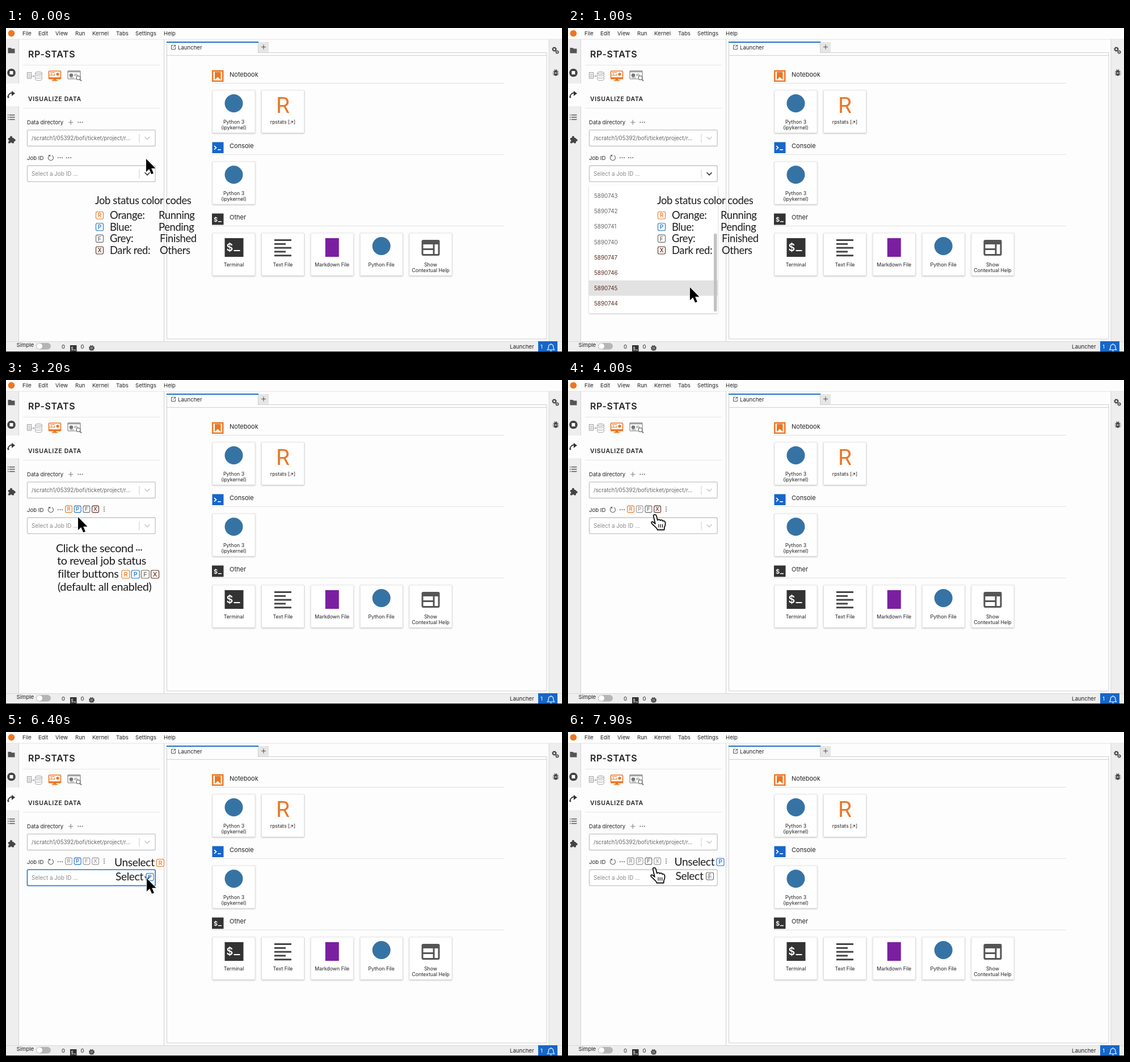
These frames come from a looping animation (980 by 572 pixels, 8 s). An HTML page:

```html
<!DOCTYPE html>
<html lang="en">
<head>
<meta charset="utf-8">
<title>Job filter demo</title>
<style>
html, body { margin: 0; width: 100%; height: 100%; overflow: hidden; background: #fff; }
svg { display: block; width: 980px; height: 572px; font-family: Inter, sans-serif; }
text { white-space: pre; }
.note { font-family: Lato, sans-serif; letter-spacing: -.38px; }
</style>
</head>
<body>
<svg viewBox="0 0 980 572">
  <defs>
    <filter id="shadow" x="-10%" y="-10%" width="120%" height="125%">
      <feDropShadow dx="0" dy="1" stdDeviation="1.3" flood-opacity=".28"/>
    </filter>
    <clipPath id="listClip"><rect x="37" y="279" width="227" height="223"/></clipPath>
  </defs>
  <g id="page"></g>
  <g id="live"></g>
</svg>
<script>
const ORANGE = '#ee7623', BLUE = '#1e6fc8', GREY = '#686868', RED = '#5c2a1e', DARK = '#333', OFF = '#999';

// Drawing helpers
const text = (x, y, s, size = 9.6, fill = '#222', more = '') =>
  `<text x="${x}" y="${y}" font-size="${size}" fill="${fill}" ${more}>${s}</text>`;
const rect = (x, y, w, h, fill, more = '') =>
  `<rect x="${x}" y="${y}" width="${w}" height="${h}" fill="${fill}" ${more}/>`;
const circle = (x, y, r, fill, more = '') =>
  `<circle cx="${x}" cy="${y}" r="${r}" fill="${fill}" ${more}/>`;
const line = (d, color, w = 1, more = '') =>
  `<path d="${d}" fill="none" stroke="${color}" stroke-width="${w}" ${more}/>`;
const shape = (d, fill, more = '') => `<path d="${d}" fill="${fill}" ${more}/>`;
const dots = (x, y, color, dx = 3.6, dy = 0, r = 1) =>
  [-1, 0, 1].map(i => circle(x + i * dx, y + i * dy, r, color)).join('');
const chevron = (y, color) => line(`M245 ${y - 2}l4 4l4-4`, color, 1.7, 'stroke-linecap="round"');
const mid = 'text-anchor="middle"';

function badge(x, y, letter, color, size = 12) {
  const h = size / 2;
  return rect(x - h, y - h, size, size, 'none', `rx="2.4" stroke="${color}" stroke-width="1.1"`) +
    text(x, y + size * .29, letter, size * .78, color, mid + ' font-weight="500"');
}

function gear(x, y, r) {
  const step = r * Math.PI / 4;
  return circle(x, y, r * .72, 'none', `stroke="#444" stroke-width="${r * .5}"`) +
    circle(x, y, r, 'none', `stroke="#444" stroke-width="${r * .45}" stroke-dasharray="${step * .5} ${step * .5}"`);
}

function field(y) {
  return rect(37.5, y, 225.7, 28.3, '#fff', 'rx="2" stroke="#c4c4c4" stroke-width="1.3"') +
    line(`M235 ${y + 7}v15`, '#ccc');
}

function card(x, y, icon, ...labels) {
  const cx = x + 37.5;
  return rect(x, y, 75, 75, '#fff', 'rx="1" stroke="#ddd" stroke-width=".8" filter="url(#shadow)"') + icon(cx, y) +
    labels.map((s, i) => text(cx, y + 59 + i * 10.3, s, 8.8, '#222', mid)).join('');
}

const icons = {
  disc: (x, y) => circle(x, y + 23, 16, '#3673a5'),
  r: (x, y) => text(x, y + 40, 'R', 39, ORANGE, mid + ' style="font-family:Roboto,sans-serif"'),
  square: (x, y) => rect(x - 12, y + 9, 24, 33, '#7b1fa2'),
  term: (x, y) => rect(x - 16, y + 9, 33, 33, DARK) +
    text(x - 13, y + 32, '$', 18, '#fff', 'font-weight="600"') + rect(x, y + 30, 11, 2, '#fff'),
  lines: (x, y) => [0, 1, 2, 3, 4].map(i =>
    rect(x - 15, y + 11 + i * 6.8, i % 2 ? 20 : 30, 3, '#444')).join(''),
  panes: (x, y) => rect(x - 16, y + 12, 32, 28, '#555', 'rx="3"') +
    rect(x - 13, y + 20, 17, 7, '#fff') + rect(x - 13, y + 30, 17, 7, '#fff') + rect(x + 7, y + 20, 6, 17, '#fff')
};

function section(y, title, icon) {
  return icon + text(394, y - 11, title, 11) + line(`M363 ${y + .5}H878`, '#e2e2e2');
}

function drawPage() {
  const menu = { File: 29, Edit: 57, View: 87, Run: 122, Kernel: 152, Tabs: 194, Settings: 228, Help: 278 };
  let s = rect(0, 0, 980, 572, '#fdfdfd') + circle(9.5, 9.5, 5.8, ORANGE);
  for (const name in menu) s += text(menu[name], 13, name);

  // Activity bars
  s += rect(0, 20, 22, 533, '#eee') + rect(957, 20, 23, 533, '#eee') + rect(0, 98, 23, 40, '#fdfdfd');
  s += line('M0 20H980', '#e2e2e2') + line('M22.5 20V98M22.5 138V553M957 20V553', '#d4d4d4');
  s += shape('M3.5 35h5l1.5 1.5h5.5v8h-12z', '#555') + circle(9.5, 79, 7.3, '#444') + rect(6.5, 76, 6, 6, '#fff');
  s += line('M3 122Q6 113 12 115', '#333', 1.6) + shape('M10 111l6 4.5l-6 4.5z', '#333') + circle(4, 122, 1.5, '#333');
  s += [153.5, 157.5, 161.5].map(y => rect(3, y - .7, 1.7, 1.5, '#555') + rect(6, y - .7, 9.5, 1.5, '#555')).join('');
  s += rect(4, 194, 10, 9.5, '#444', 'rx="1"') + circle(9, 193, 2.2, '#444') + circle(14.5, 198, 2.2, '#444') +
    circle(4, 199, 1.6, '#eee') + circle(9, 203.5, 1.6, '#eee');
  s += gear(966.5, 37.5, 3.5) + gear(971.5, 42.5, 2.7);
  s += rect(966, 74.5, 6, 10, '#444', 'rx="3"') +
    line('M964 76.5h10M963.5 79.5h11M964 82.5h10M967 73l1 2M971 73l-1 2', '#444', 1.2) + rect(967.5, 78, 3, 3, '#aaa');

  // Side panel
  s += text(39, 52, 'RP-STATS', 16, '#222', 'font-weight="600" letter-spacing=".6"');
  s += text(39, 129, 'VISUALIZE DATA', 10.5, '#222', 'font-weight="600" letter-spacing=".65"');
  s += line('M30 65.5H271M30 141.5H271', '#e6e6e6') + line('M278.5 20V553', '#d0d0d0');
  s += rect(37.5, 78.5, 7, 10.5, 'none', 'stroke="#999"') + line('M39 81.5h4M39 84h4M39 86.5h4M45 85h5M48 83l2 2l-2 2', '#999', .9);
  s += [80, 84, 88].map(y => line(`M51.5 ${y}v2.6a6 2 0 0 0 12 0v-2.6`, '#999', .9)).join('') +
    `<ellipse cx="57.5" cy="79.5" rx="6" ry="2.2" fill="#eee" stroke="#999" stroke-width=".9"/>`;
  s += rect(75.5, 76, 21, 13, '#fff', `rx="1" stroke="${ORANGE}" stroke-width="1.6"`) + rect(75, 87, 22, 3.5, ORANGE) +
    shape('M84 90h4l1 3h-6z', ORANGE) + rect(81, 92, 10, 1.5, ORANGE) + circle(91, 81.5, 2.6, ORANGE) +
    line('M78 85v-3M80.5 85v-5M83 85v-3M85.5 85v-4M78 78.5h8', ORANGE, 1.1);
  s += rect(109, 75.5, 22, 14.5, '#fff', 'rx="1" stroke="#888" stroke-width="1.2"') + line('M109 77.3h22', '#888', 1.6) +
    circle(115, 83.5, 3.3, '#777') + line('M121 81v4M123.5 80v5M126 82v3M112 88h8', '#888', 1.2) +
    circle(127.5, 88, 3.4, '#fff', 'stroke="#777" stroke-width="1.3"') + line('M130 90.5l3 3', '#777', 1.8);
  s += text(37, 169.5, 'Data directory') + line('M110 166.5h8.4M114.2 162.3v8.4', '#888', 1.2) + dots(131, 166.5, '#666');
  s += field(180.2) + text(45, 198, '/scratch1/05392/bofi/ticket/project/r...', 9.7, '#666') + chevron(194.5, '#ccc');
  s += text(37, 232.5, 'Job ID') + line('M76.5 225.2A4.6 4.6 0 1 0 81 225', '#666', 1.1) + shape('M74.5 224.2l4-.5l-.8 3.7z', '#666');
  s += dots(95.5, 229, '#666') + field(243) + text(45, 261, 'Select a Job ID ...', 9.9, '#888');

  // Launcher
  s += line('M283.5 24V549H953V43.5H444', '#cfcfcf') + line('M283 48.5H953', '#cfcfcf') + line('M444.5 24V43', '#cfcfcf');
  s += rect(283, 24, 162, 2, BLUE) + rect(445, 25, 18, 18, '#e6e6e6') + line('M450 33.5h8M454 29.5v8', '#555', 1.1);
  s += line('M295 30.5h-3.5v7h7v-3.5M296 30.5h2.7v2.7M298.5 30.5l-4 4', '#555', 1) + text(303, 37.5, 'Launcher');
  s += section(97, 'Notebook', rect(363, 74.5, 20.5, 20.5, ORANGE) + rect(365.5, 77, 15.5, 15.5, '#fff') +
    shape('M368 77.5h10.5v14l-5.2-5l-5.3 5z', ORANGE));
  s += section(223, 'Console', rect(363.5, 201.5, 20, 19.5, '#1766c9') + line('M367 208l3.5 3.3l-3.5 3.3', '#fff', 1.7) +
    rect(373, 214, 6, 1.6, '#fff'));
  s += section(349, 'Other', rect(363, 327.5, 20.5, 20, DARK) + text(366, 341.8, '$', 11, '#fff', 'font-weight="600"') +
    rect(374, 341, 6, 1.5, '#fff'));
  s += card(364, 110, icons.disc, 'Python 3', '(ipykernel)') + card(450.5, 110, icons.r, 'rpstats [↗]') +
    card(364, 236, icons.disc, 'Python 3', '(ipykernel)') + card(364, 362, icons.term, 'Terminal') +
    card(450.5, 362, icons.lines, 'Text File') + card(537.3, 362, icons.square, 'Markdown File') +
    card(624.2, 362, icons.disc, 'Python File') + card(711, 362, icons.panes, 'Show', 'Contextual Help');

  // Status bar
  s += rect(0, 553, 980, 19, '#eee') + line('M0 553.5H980', '#d8d8d8');
  s += text(18.5, 563, 'Simple') + rect(53, 556, 26, 11.5, '#b5b5b5', 'rx="5.7"') + circle(59, 561.7, 5, '#fff');
  s += text(98, 566, '0') + rect(113, 560, 11.5, 11, DARK) + text(114.5, 568.5, '$', 7, '#fff') + rect(119.5, 568, 3.5, 1, '#fff');
  s += text(131.5, 566, '0') + gear(151, 565, 4.2) + rect(149.8, 563.8, 2.4, 2.4, '#444');
  s += text(888, 566, 'Launcher') + rect(938, 553, 34, 18, '#1766c9') + text(942, 566, '1', 9.6, '#fff');
  s += line('M954.5 568h12c-2-2-1.8-3-1.8-5.5c0-5-8.4-5-8.4 0c0 2.500.2 3.500-1.800 5.500zM959 570h3M960.5 557v1.500', '#fff', 1.2);
  return s + rect(0, 571, 980, 1, '#222');
}

// Timeline, in ms
const LOOP = 8000, ROW = 27.1, TOP = 281;
const path = [
  [0, 247, 231], [250, 248, 252], [400, 248, 252], [700, 215, 440], [950, 215, 458], [1200, 214, 456],
  [1600, 126, 237], [1950, 126, 237], [2500, 127, 242], [3400, 127, 242], [3650, 138, 238], [3850, 138, 238],
  [3950, 153, 238], [4100, 153, 238], [4200, 168, 239], [4350, 168, 239], [4650, 252, 259], [4900, 261, 264],
  [5200, 258, 262], [5500, 121, 239], [5650, 121, 239], [5800, 137, 239], [6000, 137, 239], [6300, 248, 258],
  [6600, 248, 260], [6850, 235, 296], [7050, 230, 294], [7350, 137, 239], [7500, 137, 239], [7650, 152, 240], [8000, 152, 240]
];
const within = (t, ...spans) => spans.some(([a, b]) => t >= a && t < b);
const ease = u => u * u * (3 - 2 * u);

function cursorAt(t) {
  const i = path.findIndex(p => p[0] > t), [a, x, y] = path[i - 1], [b, x2, y2] = path[i];
  const k = ease((t - a) / (b - a));
  return [x + (x2 - x) * k, y + (y2 - y) * k];
}

const run = (first, count, color) => Array.from({ length: count }, (_, i) => [first - i, color]);
const pending = run(5905543, 2, BLUE), running = run(5905541, 3, ORANGE);
const all = [...pending, ...running, ...run(5890743, 4, GREY), ...run(5890747, 4, RED)];

function list(jobs, scroll, cy) {
  const h = Math.min(225.5, jobs.length * ROW + 6.5);
  const focus = Math.max(0, Math.min(jobs.length - 1, Math.floor((cy - TOP + scroll) / ROW)));
  const rows = jobs.map(([id, color], i) => {
    const y = TOP + i * ROW - scroll;
    return (i === focus ? rect(37, y, 227, ROW, '#e2e2e2') : '') + text(46, y + 17.2, id, 9.9, color);
  }).join('');
  const bar = jobs.length > 8 ? rect(257, 280 + scroll * .62, 5.5, 138, '#c2c2c2', 'rx="2.7"') : '';
  return rect(37, 278, 227, h, '#fff', 'rx="2" filter="url(#shadow)"') + `<g clip-path="url(#listClip)">${rows}${bar}</g>`;
}

const tones = { R: ORANGE, P: BLUE, F: GREY, X: RED };
const note = (x, y, s, size) => text(x, y, s, size, '#1c1c1c', 'class="note"');

function filters(t) {
  const on = {
    R: t < 5600, P: t < 3800 || within(t, [5900, 7450]), F: t < 4050 || t >= 7700, X: t < 4300
  };
  return 'RPFX'.split('').map((c, i) => badge(110.5 + i * 15.7, 228, c, on[c] ? tones[c] : OFF, 11.8)).join('') +
    dots(173, 228, '#666', 0, 3.5);
}

function legend() {
  const rows = [['R', 'Orange:', 'Running', 269], ['P', 'Blue:', 'Pending', 269],
    ['F', 'Grey:', 'Finished', 271], ['X', 'Dark red:', 'Others', 271]];
  return note(157, 311, 'Job status color codes', 18.4) + rows.map(([c, name, state, x], i) => {
    const y = 337 + i * 20.6;
    return badge(165, y - 6.3, c, tones[c], 13) + note(183, y, name, 18.4) + note(x, y, state, 18.4);
  }).join('');
}

function hint() {
  return note(88, 304, 'Click the second', 19.8) + dots(234.5, 300, '#222', 4, 0, 1.2) +
    note(90, 326, 'to reveal job status', 19.8) + note(91, 349, 'filter buttons', 19.8) +
    'RPFX'.split('').map((c, i) => badge(211 + i * 17.2, 343, c, tones[c], 14)).join('') +
    note(91, 372, '(default: all enabled)', 19.8);
}

const swap = (x, y, off, on) => note(x, y, 'Unselect', 19.2) + badge(x + 81, y - 6, off, tones[off], 13) +
  note(x + 2, y + 25, 'Select', 19.2) + badge(x + 62.500, y + 19, on, tones[on], 13);

function pointer(x, y, hand) {
  const art = hand
    ? shape('M-2.300 2.500C-2.800-.8 1.800-1.600 2.800 1.800L4.800 9.500C6 8 9 8 9.600 10C11 8.600 13.600 9 14 11C15.600 10 18 11 18.400 13.500C19 17 18.500 19 17 22L16.600 26.500H4.600C4 23-1 20-5.600 15C-7 12.500-4.500 11.500-2.500 13L.8 15.800Z',
        '#fff', 'stroke="#111" stroke-width="1.8" stroke-linejoin="round"') + line('M7 16.500v6M10.300 16.500v6M13.600 16.500v6', '#111', 1.3)
    : shape('M0 0V23L5.300 18L9.200 27L13 25.400L9.200 16.700H16.500Z', '#000',
        'stroke="#fff" stroke-width="1.6" stroke-linejoin="round" paint-order="stroke"');
  return `<g transform="translate(${x} ${y})">${art}</g>`;
}

const page = document.getElementById('page'), live = document.getElementById('live');
page.innerHTML = drawPage();

function frame(now) {
  const t = now % LOOP, [x, y] = cursorAt(t);
  const focused = within(t, [4650, 5350], [6300, 7250]);
  let s = chevron(257.500, t < 2000 || focused ? '#333' : '#ccc');
  if (focused) s += rect(37.5, 243, 225.7, 28.3, 'none', 'rx="2" stroke="#2f80d8" stroke-width="1.700"');
  s += t < 1950 ? dots(110.5, 229, t >= 1550 ? '#e4572e' : '#666') : filters(t);

  if (within(t, [350, 1250])) s += list(all, 133.5 * ease(Math.max(0, Math.min(1, (t - 600) / 300))), y);
  if (within(t, [4700, 5250])) s += list(running, 0, y);
  if (within(t, [6600, 7150])) s += list(pending, 0, y);

  if (t < 1400) s += legend();
  if (within(t, [2000, 3600])) s += hint();
  if (within(t, [5450, 6600])) s += swap(191, 237, 'R', 'P');
  if (t >= 7250) s += swap(187.5, 235.5, 'P', 'F');

  live.innerHTML = s + pointer(x, y, within(t, [1500, 2200], [3550, 4400], [5450, 6050], [7300, LOOP]));
  requestAnimationFrame(frame);
}
requestAnimationFrame(frame);
</script>
</body>
</html>
```
